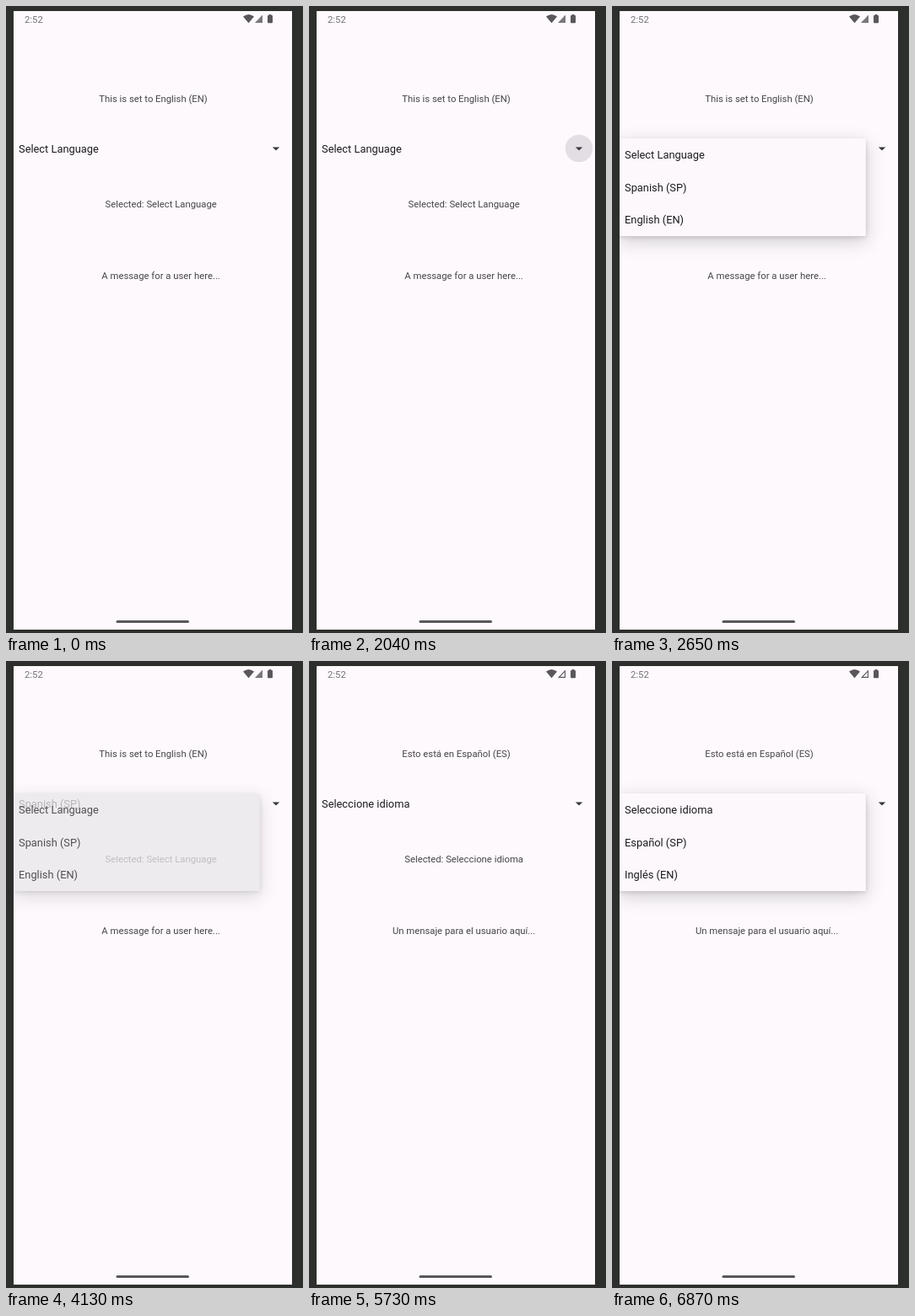
An HTML page with a canvas for the animation above (8000 ms loop, 352 px wide and 744 px high).

```html
<!DOCTYPE html>
<html lang="en">
<head>
<meta charset="utf-8">
<title>Language picker</title>
<style>
  html, body { margin: 0; width: 100%; height: 100%; overflow: hidden; background: #2d2f2c; }
  canvas { display: block; width: 352px; height: 744px; }
</style>
</head>
<body>
<canvas id="stage"></canvas>
<script>
const W = 352, H = 744, LOOP = 8000;
const SCREEN = { x: 9, y: 6, w: 330, h: 734 };
const MENU = { x: 9, y: 157, w: 291.5, h: 116, row: 38.5 };
const ANCHOR_H = 31;
const ARROW = { x: 320, y: 169 };
const BEZEL = '#2d2f2c', PAPER = '#fdf9fc', SHEET = '#fcf8fb', FADED_SHEET = '#eae7eb';
const TEXT = '#48454c', DARK = '#1d1b20', ICON = '#5a575b', RIPPLE = '#e2dee3';

const LANGUAGE_AT = 4340, SIGNAL_AT = 5730, CLOSE_AT = 4130, CLOSE_STEP = 70;
const OPENINGS = [
  { press: 1535, open: 2230, release: 2260 },
  { press: 6070, open: 6357, release: 6510 }
];

const EN = {
  title: 'This is set to English (EN)',
  message: 'A message for a user here...',
  items: ['Select Language', 'Spanish (SP)', 'English (EN)']
};
const ES = {
  title: 'Esto está en Español (ES)',
  message: 'Un mensaje para el usuario aquí...',
  items: ['Seleccione idioma', 'Español (SP)', 'Inglés (EN)']
};

const canvas = document.getElementById('stage');
const ctx = canvas.getContext('2d');
const ratio = window.devicePixelRatio || 1;
canvas.width = W * ratio;
canvas.height = H * ratio;

const clamp = v => Math.max(0, Math.min(1, v));
const span = (t, from, length) => clamp((t - from) / length);

// cubic-bezier(.4, 0, .2, 1)
function standardEase(x) {
  if (x <= 0 || x >= 1) return clamp(x);
  let lo = 0, hi = 1, s = 0.5;
  for (let i = 0; i < 20; i++) {
    s = (lo + hi) / 2;
    const r = 1 - s;
    if (1.2 * r * r * s + 0.6 * r * s * s + s ** 3 < x) lo = s; else hi = s;
  }
  return 3 * (1 - s) * s * s + s ** 3;
}

function label(text, x, y, size, color, align = 'left') {
  ctx.font = `${size}px Roboto, sans-serif`;
  ctx.textAlign = align;
  ctx.fillStyle = color;
  ctx.fillText(text, x, y);
}

function polygon(points) {
  ctx.beginPath();
  points.forEach(([x, y]) => ctx.lineTo(x, y));
  ctx.closePath();
}

function pill(x, y, w, h, r) {
  ctx.beginPath();
  ctx.roundRect(x, y, w, h, r);
  ctx.fill();
}

function drawFrame() {
  ctx.fillStyle = BEZEL;
  ctx.fillRect(0, 0, W, H);
  ctx.fillStyle = PAPER;
  ctx.fillRect(SCREEN.x, SCREEN.y, SCREEN.w, SCREEN.h);
}

function drawSystemBars(t) {
  label('2:52', 22, 19.5, 11.3, '#767277');
  ctx.fillStyle = ICON;

  // wifi
  ctx.beginPath();
  ctx.moveTo(287.5, 20.3);
  ctx.lineTo(281, 12.6);
  ctx.quadraticCurveTo(287.5, 7.6, 294, 12.6);
  ctx.closePath();
  ctx.fill();

  // cell signal
  polygon([[304, 10.6], [304, 20], [295, 20]]);
  if (t < SIGNAL_AT) {
    ctx.globalAlpha = 0.8;
    ctx.fill();
    ctx.globalAlpha = 1;
  } else {
    polygon([[303.4, 11.8], [303.4, 19.4], [296.2, 19.4]]);
    ctx.strokeStyle = ICON;
    ctx.lineWidth = 1.1;
    ctx.stroke();
  }

  // battery
  pill(310, 11, 6, 9.3, 1);
  ctx.fillRect(311.6, 9.9, 2.8, 1.5);

  pill(130.5, 729, 86.5, 3, 1.5);
}

function drawRipple(t) {
  for (const { press, release } of OPENINGS) {
    if (t < press || t > release + 375) continue;
    const grow = 1 - (1 - span(t, press, 450)) ** 2.5;
    ctx.globalAlpha = span(t, press, 75) * (1 - span(t, release, 360));
    ctx.fillStyle = RIPPLE;
    ctx.beginPath();
    ctx.arc(ARROW.x, ARROW.y, 16.3 * (0.3 + 0.7 * grow), 0, Math.PI * 2);
    ctx.fill();
    ctx.globalAlpha = 1;
  }
}

function drawPage(t, lang) {
  const chosen = t >= CLOSE_AT && t < LANGUAGE_AT ? 1 : 0;
  label(lang.title, 174.5, 114.3, 11.3, TEXT, 'center');
  label(lang.items[chosen], 15, 174.3, 12.85, DARK);
  label('Selected: ' + lang.items[0], 183.6, 238.6, 11.3, TEXT, 'center');
  label(lang.message, 183.6, 323.8, 11.3, TEXT, 'center');
  drawRipple(t);
  ctx.fillStyle = '#3a373d';
  polygon([[315.8, 167.4], [324.2, 167.4], [320, 171.6]]);
  ctx.fill();
}

function menuState(t) {
  if (t >= CLOSE_AT && t < LANGUAGE_AT) {
    const step = Math.floor((t - CLOSE_AT) / CLOSE_STEP);
    return { shown: 1, alpha: 0.75 * (1 - step / 3), fill: FADED_SHEET };
  }
  const { open } = OPENINGS[t < CLOSE_AT ? 0 : 1];
  if (t <= open) return null;
  return { shown: standardEase(span(t, open, 250)), alpha: span(t, open, 100), fill: SHEET };
}

function castShadow(box, blur, drop, opacity) {
  ctx.shadowBlur = blur * ratio;
  ctx.shadowOffsetY = drop * ratio;
  ctx.shadowColor = `rgba(50,45,58,${opacity})`;
  ctx.fillRect(...box);
  ctx.shadowColor = 'transparent';
}

function drawMenu(t, lang) {
  const state = menuState(t);
  if (!state) return;
  const { shown, alpha, fill } = state;
  const x = MENU.x + 20 * (1 - shown);
  const top = MENU.y - 45 * (1 - shown);
  const box = [x, MENU.y, MENU.w, ANCHOR_H + (MENU.h - ANCHOR_H) * shown];
  const depth = shown * shown;

  ctx.save();
  ctx.beginPath();
  ctx.rect(SCREEN.x, SCREEN.y, SCREEN.w, SCREEN.h);
  ctx.clip();
  ctx.globalAlpha = alpha;
  ctx.fillStyle = fill;

  // keep both shadows outside the sheet
  ctx.save();
  ctx.beginPath();
  ctx.rect(0, 0, W, H);
  ctx.rect(...box);
  ctx.clip('evenodd');
  castShadow(box, 20, 6, 0.22 * depth);
  castShadow(box, 5, 1.5, 0.16 * depth);
  ctx.restore();

  ctx.fillRect(...box);
  ctx.beginPath();
  ctx.rect(...box);
  ctx.clip();
  lang.items.forEach((item, i) =>
    label(item, x + 6, top + 24.3 + i * MENU.row, 12.85, DARK));
  ctx.restore();
}

function draw(t) {
  const lang = t < LANGUAGE_AT ? EN : ES;
  ctx.setTransform(ratio, 0, 0, ratio, 0, 0);
  drawFrame();
  drawSystemBars(t);
  drawPage(t, lang);
  drawMenu(t, lang);
}

const start = performance.now();
function tick() {
  draw((performance.now() - start) % LOOP);
  requestAnimationFrame(tick);
}
tick();
</script>
</body>
</html>
```
